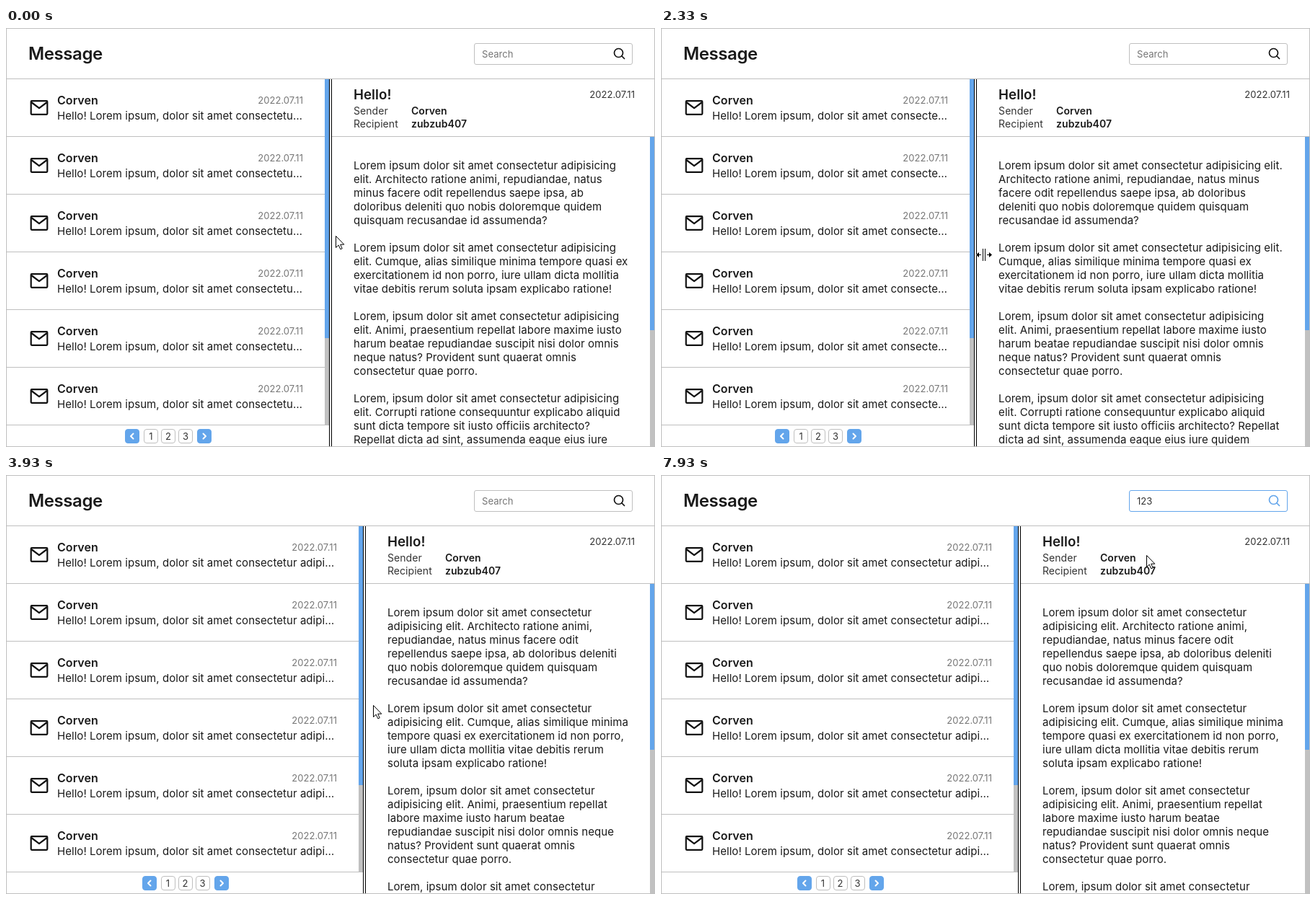
Write an HTML page that moves like this. It is 900x581 px and loops after 8000 ms.

```html
<!DOCTYPE html>
<html lang="en">
<head>
<meta charset="utf-8">
<title>Message</title>
<style>
  html, body { margin: 0; width: 100%; height: 100%; overflow: hidden; background: #fff; }
  #stage {
    --d: 448px; --blue: #63a5eb; --line: #bfbfbf;
    position: relative; width: 900px; height: 581px; overflow: hidden;
    background: #fff; color: #1a1a1a;
    font: 400 15px/19px Inter, Arial, sans-serif; letter-spacing: .05px;
  }
  #stage div, #stage svg, #stage span { position: absolute; box-sizing: border-box; white-space: nowrap; }
  #stage b { font-weight: 600; }
  .hr { height: 1px; background: var(--line); }
  .bar { width: 6px; background: #c1c1c1; }
  .thumb { left: 0; top: 0; width: 6px; background: var(--blue); }
  #frame { inset: 0; border: 1px solid var(--line); }
  #title { left: 31px; top: 21px; font-size: 24px; line-height: 29px; letter-spacing: -.4px; }
  #search { left: 649px; top: 21px; width: 220px; height: 30px; border: 1px solid var(--line); border-radius: 3px; color: #111; }
  #search span { left: 10px; top: 5px; font-size: 13px; color: #757575; }
  #search svg { left: 191px; top: 4px; }
  #search.on { border-color: var(--blue); color: var(--blue); }
  #search.on span { color: #333; }

  .row { left: 1px; width: calc(var(--d) - 7px); height: 80px; border-bottom: 1px solid var(--line); }
  .row svg { left: 32px; top: 28px; }
  .row b { position: absolute; left: 70px; top: 20px; font-size: 16px; }
  .row .date { right: 30px; top: 20px; font-size: 13px; color: #777; }
  #stage .row .text { left: 70px; right: 30px; top: 41px; overflow: hidden; text-overflow: ellipsis; }

  .page { top: 556px; width: 20px; height: 20px; border: 1px solid var(--line); border-radius: 4px;
    font-size: 13px; line-height: 18px; text-align: center; color: #333; background: #fff; }
  .page.nav { background: var(--blue); border-color: var(--blue); }
  .page.on { background: #17355d; border-color: #17355d; color: #fff; font-weight: 600; }
  .page svg { left: 0; top: 0; }

  #split { left: var(--d); top: 71px; width: 4px; height: 509px; background: #fff; border: solid #000; border-width: 0 1px; }
  #mail { left: calc(var(--d) + 34px); top: 71px; font-size: 14px; color: #333; }
  #mail b { color: #1a1a1a; }
  #mail .subject { font-size: 18.720px; font-weight: 600; top: 11px; line-height: 22px; color: #1a1a1a; }
  #mailDate { right: 28px; top: 83px; font-size: 13px; color: #333; }
  #view { left: calc(var(--d) + 34px); top: 151px; width: calc(830px - var(--d)); height: 429px; overflow: hidden; }
  #stage #body { left: 0; top: 30px; width: 100%; white-space: normal; }
  #body p { margin: 0 0 19px; }
  #body p:last-child { margin: 0; }
  #cursor { left: 0; top: 0; width: 1px; height: 1px; overflow: visible; }
  #cursor.invert { mix-blend-mode: difference; }
</style>
</head>
<body>
<div id="stage">
  <div id="title"><b>Message</b></div>
  <div id="search">
    <span id="query">Search</span>
    <svg width="20" height="20" fill="none" stroke="currentColor" stroke-width="1.7" stroke-linecap="round">
      <circle cx="8.500" cy="8.500" r="6"/><path d="M13 13L16.500 16.500"/>
    </svg>
  </div>
  <div class="hr" style="left:0;top:70px;width:900px"></div>

  <div id="list"></div>
  <div class="bar" style="left:calc(var(--d) - 6px);top:71px;height:479px"><div class="thumb" style="height:359px"></div></div>
  <div class="hr" style="left:0;top:550px;width:var(--d)"></div>
  <div id="pages"></div>
  <div id="split"></div>

  <div id="mail">
    <span class="subject">Hello!</span>
    <span style="top:34px">Sender</span><span style="top:34px;left:80px"><b>Corven</b></span>
    <span style="top:52px">Recipient</span><span style="top:52px;left:80px"><b>zubzub407</b></span>
  </div>
  <div id="mailDate">2022.07.11</div>
  <div class="hr" style="left:calc(var(--d) + 4px);top:150px;right:0"></div>
  <div id="view"><div id="body"></div></div>
  <div class="bar" style="left:893px;top:151px;height:429px"><div class="thumb" id="thumb"></div></div>
  <div id="frame"></div>

  <svg id="cursor">
    <path data-kind="arrow" d="M0 0V16L3.700 12.600L6.300 18.300L8.700 17.300L6.200 11.700H11.300Z" fill="#fff" stroke="#000"/>
    <g data-kind="col" fill="#fff" stroke="none">
      <path d="M-2 -8.500h1v17h-1ZM1 -8.500h1v17h-1ZM-8 -.5h4v1h-4ZM4 -.5h4v1h-4Z"/>
      <path d="M-11 0L-7 -3.500V3.500ZM11 0L7 -3.500V3.500Z"/>
    </g>
    <path data-kind="hand" fill="#fff" stroke="#000"
      d="M-1.500 11V1.500a1.500 1.500 0 0 1 3 0V7q3-1 3 1q3-1 3 1q2.500-.5 2.500 1.500V14l-2 4v3H-1.500v-2l-4-6q-1.500-3 1-2.500l3 2"/>
    <path data-kind="beam" d="M-3 -8H-1L0 -7L1 -8H3M0 -7V7M-3 8H-1L0 7L1 8H3" fill="none" stroke="#fff"/>
  </svg>
</div>
<script>
const LOOP = 8000, STEP = 200 / 3;
const $ = id => document.getElementById(id);
const lorem = 'Lorem ipsum dolor sit amet consectetur adipisicing elit. ';
const lorem2 = lorem.replace('Lorem', 'Lorem,');
const second = lorem + 'Cumque, alias similique minima tempore quasi ex exercitationem id non porro, iure ullam dicta mollitia vitae debitis rerum soluta ipsam explicabo ratione!';
const paragraphs = [
  lorem + 'Architecto ratione animi, repudiandae, natus minus facere odit repellendus saepe ipsa, ab doloribus deleniti quo nobis doloremque quidem quisquam recusandae id assumenda?',
  second,
  lorem2 + 'Animi, praesentium repellat labore maxime iusto harum beatae repudiandae suscipit nisi dolor omnis neque natus? Provident sunt quaerat omnis consectetur quae porro.',
  lorem2 + 'Corrupti ratione consequuntur explicabo aliquid sunt dicta tempore sit iusto officiis architecto? Repellat dicta ad sint, assumenda eaque eius iure quidem repudiandae!',
  lorem.replace('tur', 'tur,') + 'Unde reiciendis esse deleniti praesentium eum, consequatur optio aperiam. Doloribus natus saepe ipsa quo nobis minus quidem, ab odit quisquam recusandae id assumenda?',
  second
];
$('body').innerHTML = paragraphs.map(p => `<p>${p}</p>`).join('');

const envelope = `<svg width="28" height="24" fill="none" stroke="#111" stroke-width="2.200" stroke-linejoin="round">
  <rect x="1.700" y="2.200" width="22.600" height="18.600" rx="1"/><path d="M2.200 4L13 12.200L23.800 4"/></svg>`;
$('list').innerHTML = Array.from({ length: 6 }, (_, i) => `<div class="row" style="top:${71 + i * 80}px">${envelope}
  <b>Corven</b><span class="date">2022.07.11</span>
  <div class="text">Hello! Lorem ipsum, dolor sit amet consectetur adipisicing elit. Architecto ratione</div></div>`).join('');

const chevron = d => `<svg width="18" height="18" fill="none" stroke="#fff" stroke-width="2" stroke-linecap="round" stroke-linejoin="round"><path d="${d}"/></svg>`;
const pageLabels = [chevron('M10.500 5.500L7 9L10.500 12.500'), 1, 2, 3, chevron('M7.500 5.500L11 9L7.500 12.500')];
const pageOffsets = [-59, -33, -9, 15, 41];
$('pages').innerHTML = pageLabels.map((label, i) =>
  `<div class="page${i % 4 ? '' : ' nav'}" style="left:calc(var(--d) / 2 + ${pageOffsets[i]}px)">${label}</div>`).join('');
const pages = [...document.querySelectorAll('.page')];
const cursors = [...document.querySelectorAll('[data-kind]')];

// time, divider x
const divider = [
  [1200, 448], [1330, 432], [1600, 368], [1870, 303], [1970, 302], [2070, 311], [2200, 366], [2333, 434],
  [2500, 492], [2600, 495], [2750, 495], [2930, 452], [3130, 352], [3267, 308.5], [3340, 302.5], [3440, 303],
  [3530, 330], [3800, 477], [3867, 495]
];
// time, x, y, pointer kind from then on
const pointer = [
  [0, 457.5, 288.5, 'arrow'], [70, 457.5, 288.5, 'arrow'], [133, 455, 287, 'arrow'], [200, 451, 294, 'col'],
  [267, 450.5, 295, 'col'], [866, 450.5, 295, 'col'], [933, 450.5, 304.5, 'col'], [1600, 361, 304.5, 'col'],
  [2333, 447, 314.5, 'col'], [3267, 306, 318.5, 'col'], [3866, 500, 327, 'col'], [3933, 509.5, 319.5, 'arrow'],
  [4130, 470, 380, 'arrow'], [4450, 250, 530, 'arrow'], [4667, 189, 564, 'hand'], [4830, 192, 566, 'hand'],
  [5070, 223, 567, 'hand'], [5333, 246.5, 566.5, 'hand'], [5533, 262, 567, 'hand'], [5750, 272, 567, 'hand'],
  [6000, 297, 566, 'hand'], [6200, 300, 562, 'hand'], [6267, 390, 430, 'arrow'], [6400, 611.5, 107.5, 'arrow'],
  [6600, 675, 62, 'arrow'], [6733, 705, 38, 'beam'], [7000, 700, 37, 'beam'], [7130, 675, 65, 'arrow'],
  [7267, 663.5, 95.5, 'arrow'], [7333, 663.5, 95.5, 'none'], [7866, 663.5, 95.5, 'arrow'], [7933, 673.5, 111.5, 'arrow']
];
const hovers = [[0, -1], [4800, 0], [5070, 1], [5590, 2], [5860, 3], [6130, 4], [6460, -1]];
const queries = [[0, 'Search'], [6930, ''], [7330, '1'], [7460, '12'], [7660, '123']];

const lastKey = (table, t) => table.findLast(k => k[0] <= t + 1) || table[0];

function mix(table, t, col) {
  const i = table.findIndex(k => k[0] > t);
  if (i < 0) return table.at(-1)[col];
  if (i === 0) return table[0][col];
  const a = table[i - 1], b = table[i];
  return a[col] + (b[col] - a[col]) * (t - a[0]) / (b[0] - a[0]);
}

function render(t) {
  $('stage').style.setProperty('--d', mix(divider, t, 1).toFixed(1) + 'px');
  $('thumb').style.height = Math.round(430 * 430 / ($('body').offsetHeight + 63)) + 'px';

  const hover = lastKey(hovers, t)[1];
  pages.forEach((p, i) => p.classList.toggle('on', i === hover));

  $('query').textContent = lastKey(queries, t)[1];
  $('search').classList.toggle('on', t > 6929);

  const kind = lastKey(pointer, t)[3];
  const dragging = kind === 'col' && t > 1150;
  // the divider trails the pointer slightly
  const x = dragging ? mix(divider, t + 38, 1) + 1 : mix(pointer, t, 1);
  const y = mix(pointer, t, 2);
  $('cursor').classList.toggle('invert', kind === 'col' || kind === 'beam');
  cursors.forEach(c => {
    c.style.display = c.dataset.kind === kind ? '' : 'none';
    c.setAttribute('transform', `translate(${Math.floor(x) + (kind === 'col' ? 0 : 0.5)} ${Math.floor(y) + 0.5})`);
  });
}

let shown = -1;
function tick() {
  const step = Math.floor((performance.now() % LOOP + 4) / STEP) % 120;
  if (step !== shown) render((shown = step) * STEP);
  requestAnimationFrame(tick);
}
tick();
</script>
</body>
</html>
```
